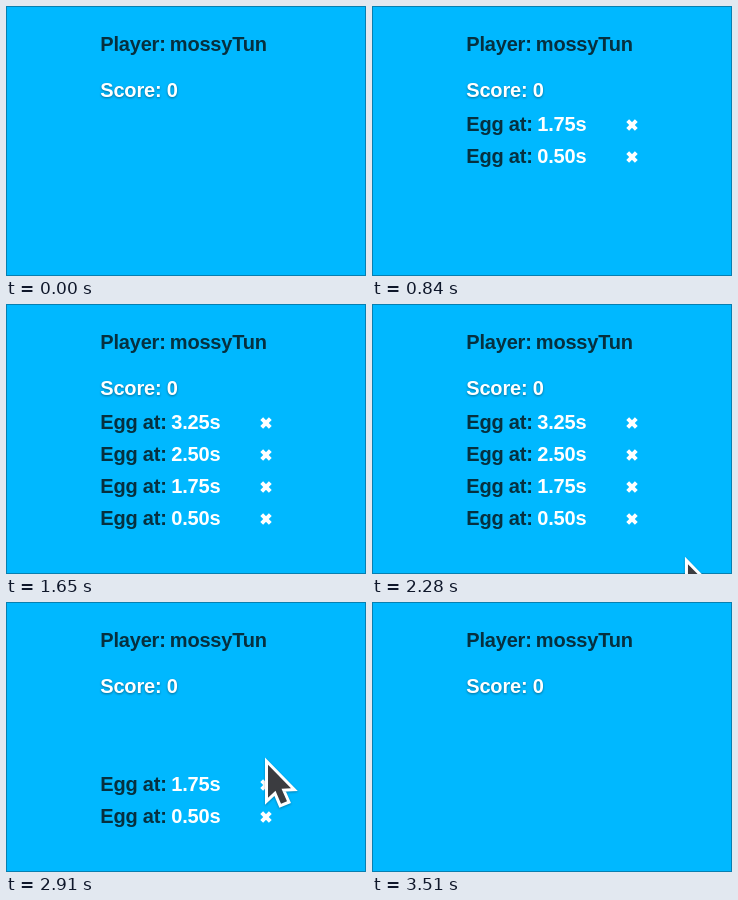
An HTML page that plays this animation: 360x270 px, repeating every 4110 ms.

```html
<!DOCTYPE html>
<html lang="en">
<head>
<meta charset="utf-8">
<title>Egg score</title>
<style>
  html, body { margin: 0; width: 100%; height: 100%; overflow: hidden; background: #00b8ff; }
  svg { display: block; width: 100vw; height: 100vh; }
  text { font: bold 20px "Liberation Sans", Arial, sans-serif; letter-spacing: -0.2px; fill: #06303f; }
  .light { fill: #fff; }
  .score { filter: drop-shadow(0 1px 1px rgba(0, 0, 0, .4)); }
  .cross { stroke: #fff; stroke-width: 4; }
  .frame { fill: none; stroke: #087fb0; }
  .pointer { fill: #3b3c40; stroke: #fff; stroke-width: 6; stroke-miterlimit: 8; paint-order: stroke;
    filter: drop-shadow(0 1px 1px rgba(0, 0, 0, .3)); }
</style>
</head>
<body>
<svg viewBox="0 0 360 270">
  <rect class="frame" x=".5" y=".5" width="359" height="269"/>
  <text x="94.3" y="45">Player:</text>
  <text x="163.8" y="45">mossyTun</text>
  <text class="light score" x="94.3" y="91">Score: 0</text>
  <g id="eggs"></g>
  <path id="pointer" class="pointer" d="M3 7V40L10.5 33L16 46L22 43.5L16.5 31L26 30.5Z"/>
</svg>
<script>
  const LOOP = 4110, TICK = 30, ROW = 32;
  const FADE = 60, SLIDE = 210;
  const added = [390, 630, 1050, 1440];
  const labels = ["0.50s", "1.75s", "2.50s", "3.25s"];

  // Pointer legs: start, end, from [x, y], to [x, y]
  const spot = row => [259, 120 + 31 * row];
  const hop = row => [2400 + 240 * row, 2520 + 240 * row, spot(row - 1), spot(row)];
  const legs = [
    [2235, 2430, [321.4, 274], spot(0)],
    hop(1), hop(2), hop(3),
    [3360, 3510, spot(3), [364, 213]]
  ];

  const progress = (t, start, length) => Math.min(1, Math.max(0, (t - start) / length));
  const ease = p => p * p * (3 - 2 * p);
  const place = (node, x, y) => node.setAttribute("transform", `translate(${x} ${y})`);

  const pointer = document.getElementById("pointer");
  const list = document.getElementById("eggs");
  list.innerHTML = labels.map(label => `<g>
    <text x="94.3" y="125">Egg at:</text>
    <text class="light" x="165.3" y="125">${label}</text>
    <path class="cross" d="M255.7 114.7l8.6 8.6m0-8.6l-8.6 8.6"/>
  </g>`).join("");
  const eggs = [...list.children];

  function draw(t) {
    eggs.forEach((egg, i) => {
      const removed = 2550 + 240 * (3 - i);
      const y = added.slice(i + 1).reduce((sum, start) => sum + ROW * ease(progress(t, start, SLIDE)), 0);
      egg.style.opacity = progress(t, added[i], FADE) - progress(t, removed, FADE);
      place(egg, 0, y);
    });

    const [start, end, from, to] = legs.filter(leg => leg[0] <= t).pop() || legs[0];
    const p = ease(progress(t, start, end - start));
    pointer.style.visibility = t > 2250 && t < 3510 ? "visible" : "hidden";
    place(pointer, ...from.map((v, k) => v + (to[k] - v) * p));
  }

  function play() {
    const t = performance.now() % LOOP;
    draw(Math.floor(t / TICK) * TICK);
    requestAnimationFrame(play);
  }
  play();
</script>
</body>
</html>
```
